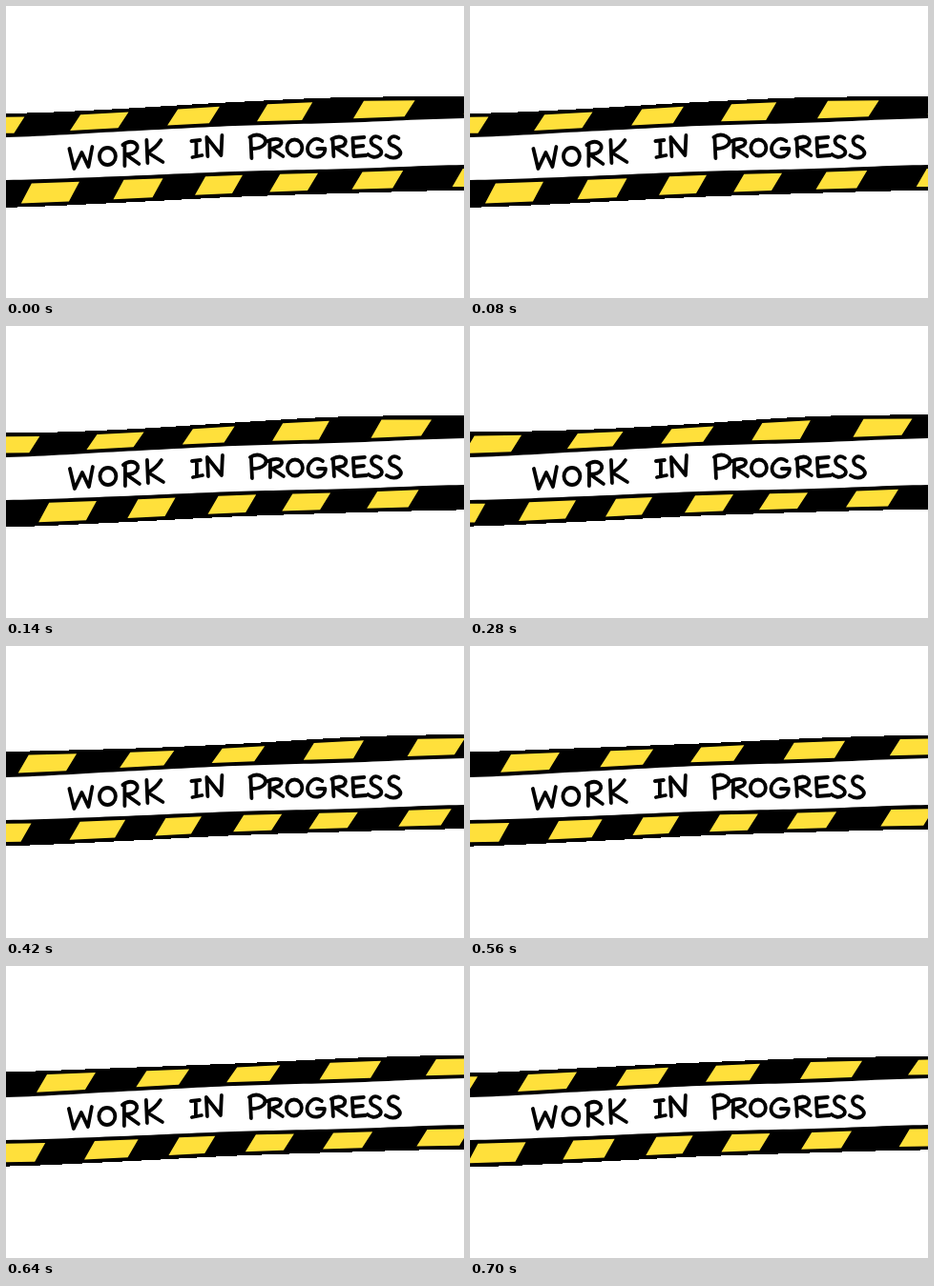
An HTML page for the animation above (0.84 s loop, 480 by 307 pixels).

```html
<!DOCTYPE html>
<html lang="en">
<head>
<meta charset="utf-8">
<title>Work in progress</title>
<style>
  html, body { margin: 0; width: 100%; height: 100%; overflow: hidden; background: #fff; }
  svg { display: block; width: 100%; height: 100%; }
  #lettering { fill: none; stroke: #000; stroke-width: 3.8; stroke-linecap: round; stroke-linejoin: round; }
</style>
</head>
<body>
<svg viewBox="0 0 480 307" role="img" aria-label="WORK IN PROGRESS">
  <path id="tape" shape-rendering="crispEdges"/>
  <path id="gap" fill="#fff"/>
  <path id="stripes" fill="#ffe03b"/>
  <g id="lettering">
    <path d="M67 150L72 171L80 154L87 169L91 148"/>
    <ellipse cx="107" cy="158" rx="8.5" ry="9"/>
    <path d="M125 145L125 168M123 146C132 139 142 145 137 152Q134 156 126 156L140 166"/>
    <path d="M148 141L149 165M163 141Q158 149 149 154L165 164"/>
    <path d="M195 142L204 141M200 142L200 158M196 159L206 157"/>
    <path d="M212 158L211 138L226 157L227 136"/>
    <path d="M257 138L258 160M256 138C265 132 277 139 271 146Q267 150 259 150"/>
    <path d="M277 143L277 159M275 142C286 137 293 142 287 147L279 150L291 158"/>
    <ellipse cx="303" cy="149" rx="8" ry="8.5"/>
    <path d="M332 142C323 135 315 146 317 153C320 161 335 161 335 150L327 150"/>
    <path d="M343 140L344 158M342 140C352 134 361 141 354 147L346 149L358 157"/>
    <path d="M376 138L364 139L365 158L378 157M365 148L375 147"/>
    <path d="M393 139C386 134 380 141 385 146C392 149 397 153 392 157C388 160 383 159 380 156"/>
    <path d="M412 139C405 134 399 141 404 146C412 149 417 154 412 158C407 161 402 159 399 157"/>
  </g>
</svg>
<script>
const HOLD = 140, POSES = 6, WIDTH = 480, SLANT = 11, INSET = 4;

// Resting edge heights at five even steps across the stage.
const upperOuter = [112, 108, 102, 96, 94];
const upperInner = [138, 132, 126, 122.5, 118];
const lowerInner = [183, 179, 174, 171, 167];
const lowerOuter = [211, 206, 200, 196, 193];

// Left end and length of a stripe after each full loop of its journey.
const upperBand = { left: [-50, 50, 153, 247, 346, 459, 575], length: [47, 51, 44, 46, 54, 47, 47], lead: 1 };
const lowerBand = { left: [-45, 51, 142, 225, 303, 394, 494], length: [50, 49, 38, 40, 40, 44, 46], lead: 4 };

const $ = id => document.getElementById(id);
const clamp = (v, max) => Math.max(0, Math.min(max, v));

// Catmull-Rom curve through evenly spaced knots.
function curve(knots, u) {
  const last = knots.length - 1;
  const at = i => knots[clamp(i, last)];
  const i = clamp(Math.floor(u), last - 1), t = clamp(u - i, 1);
  const [a, b, c, d] = [at(i - 1), at(i), at(i + 1), at(i + 2)];
  return b + t / 2 * (c - a + t * (2 * a - 5 * b + 4 * c - d + t * (3 * (b - c) + d - a)));
}

const edge = (knots, sway = () => 0) => x => curve(knots, x / WIDTH * 4) + sway(x);

const polygon = points => 'M' + points.map(p => p.join(' ')).join('L') + 'Z';

function ribbon(top, bottom) {
  const xs = Array.from({ length: 61 }, (_, i) => i * 8);
  return polygon([...xs.map(x => [x, top(x)]), ...xs.reverse().map(x => [x, bottom(x)])]);
}

function stripePath({ left, length, lead }, pose, top, bottom) {
  const upper = x => [x + SLANT, top(x + SLANT) + INSET];
  const lower = x => [x, bottom(x) - INSET];
  const progress = (pose + lead) % POSES / POSES;
  return left.map((_, loop) => {
    const start = curve(left, loop + progress);
    const end = start + curve(length, loop + progress);
    return polygon([lower(start), upper(start), upper(end), lower(end)]);
  }).join('');
}

function draw(pose) {
  const phase = 2 * Math.PI * pose / POSES;
  const top = edge(upperOuter, x => Math.cos(phase - 2 * Math.PI * x / WIDTH));
  const bottom = edge(lowerOuter, () => 0.8 * Math.cos(phase));
  const gapTop = edge(upperInner), gapBottom = edge(lowerInner);
  $('tape').setAttribute('d', ribbon(top, bottom));
  $('gap').setAttribute('d', ribbon(gapTop, gapBottom));
  $('stripes').setAttribute('d',
    stripePath(upperBand, pose, top, gapTop) + stripePath(lowerBand, pose, gapBottom, bottom));
  $('lettering').setAttribute('transform', `translate(${0.6 * Math.sin(phase) - 0.6})`);
}

function tick() {
  draw(Math.floor(performance.now() / HOLD) % POSES);
  requestAnimationFrame(tick);
}
tick();
</script>
</body>
</html>
```
